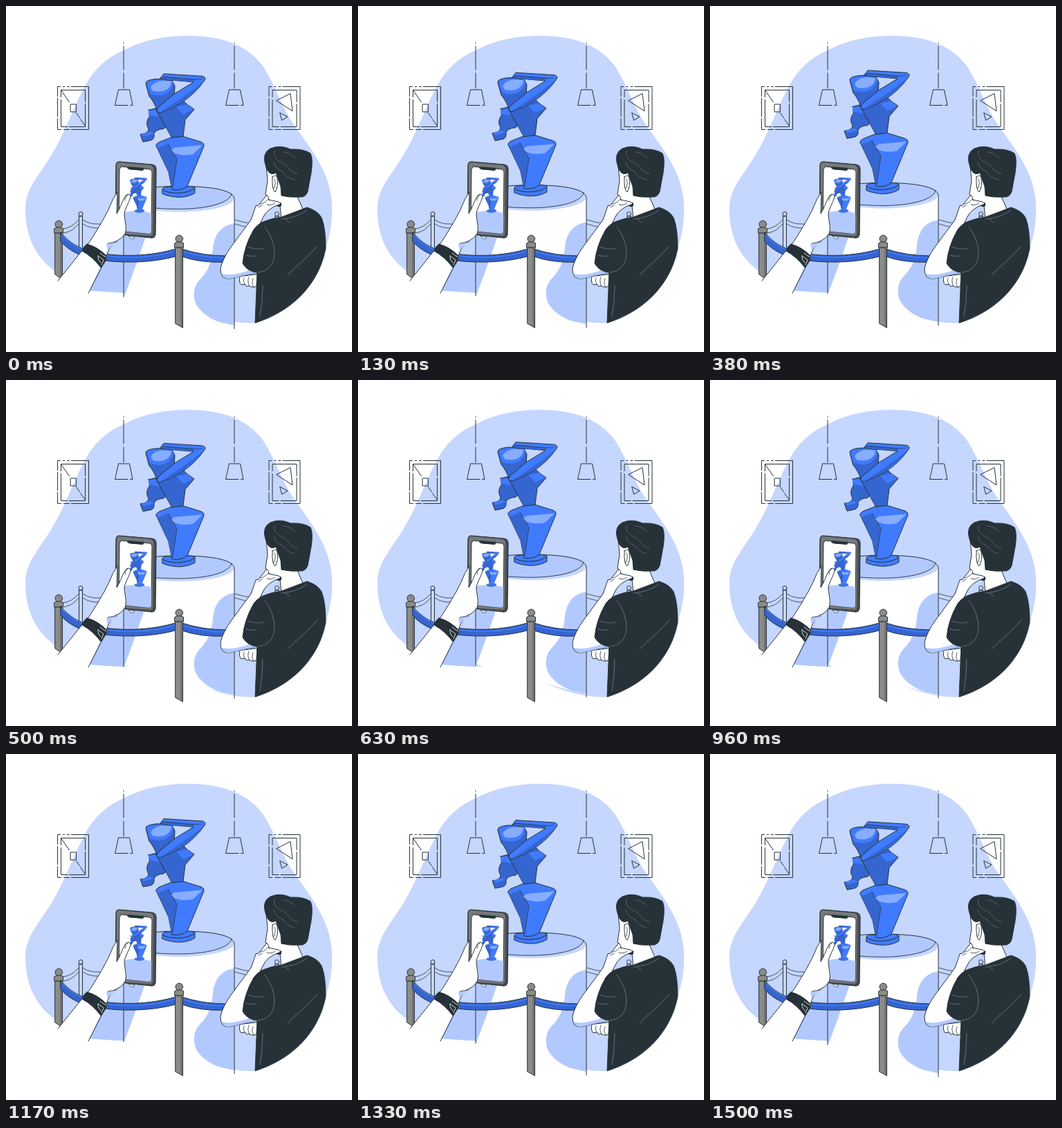
Recreate the animation shown at these times as an HTML page with a canvas. Size 500 px wide and 500 px high, loop 1.54 s.

```html
<!DOCTYPE html>
<html lang="en">
<head>
<meta charset="utf-8">
<title>Museum visit</title>
<style>
  html, body { margin: 0; width: 100%; height: 100%; overflow: hidden; background: #fff; }
  canvas { display: block; width: 500px; height: 500px; }
</style>
</head>
<body>
<canvas id="stage" width="500" height="500"></canvas>
<script>
const ctx = document.getElementById('stage').getContext('2d');
const LOOP = 1540, RISE = 10;
const INK = '#263238', PALE = '#c5d6ff', SHADE = '#b2c9ff', BLUE = '#407bff',
      DEEP = '#3565cf', GLOSS = '#87adff', GREY = '#8b8b8b', WHITE = '#fff';
const cache = new Map();

function path(d) {
  if (!cache.has(d)) cache.set(d, new Path2D(d));
  return cache.get(d);
}

function fill(d, color) {
  ctx.fillStyle = color;
  ctx.fill(path(d));
}

function line(d, width = 1, color = INK) {
  ctx.strokeStyle = color;
  ctx.lineWidth = width;
  ctx.stroke(path(d));
}

function shape(d, color, width = 1) {
  fill(d, color);
  line(d, width);
}

function ball(x, y, r, color) {
  ctx.beginPath();
  ctx.arc(x, y, r, 0, Math.PI * 2);
  ctx.fillStyle = color;
  ctx.fill();
  ctx.strokeStyle = INK;
  ctx.lineWidth = 1;
  ctx.stroke();
}

function shifted(x, y, draw, scale = 1) {
  ctx.save();
  ctx.translate(x, y);
  ctx.scale(scale, scale);
  draw();
  ctx.restore();
}

function blob() {
  fill(`M262 43C313 43 350 57 372 88C390 116 398 146 417 173C443 209 470 244 471 288
    C472 318 467 334 461 353C453 386 428 436 360 458
    C327 460 296 448 265 437C235 425 202 414 165 414Q140 413 118 411
    C88 398 61 379 48 361C33 341 28 316 28 293C28 262 50 243 67 213
    C86 182 98 143 119 107C136 82 152 72 172 63C199 49 229 43 262 43Z`, PALE);
  fill('M144 366Q157 370 170 371V414.5L118 411Z', SHADE);
}

function lamp(x) {
  line(`M${x} 53V54M${x} 58V92M${x} 97V119M${x - 7} 121H${x + 8.5}L${x + 13} 143.5H${x + 9.5}
    M${x + 6} 143.5H${x - 12.5}L${x - 7.5} 121`);
}

function pictureFrame() {
  line(`M0 14V0H4M8 0H10M14 0H17M20 0H45V62H20M17 62H9M5 62H0V46M0 43V17
    M5 15V5H40V22M40 25V58H17M14 58H5V19`);
}

function pictures() {
  shifted(74.5, 116.5, () => {
    pictureFrame();
    line('M19 25.5H27V36.5H19ZM5 5L17 22.5M27 38L32 45M33 47L40 57');
  });
  shifted(380, 116.5, () => {
    pictureFrame();
    line('M11 20L31 10L34 35ZM16 38L27 43.5L19 48.5Z');
  });
}

function backRopes() {
  for (const x of [108, 391.5]) {
    line(`M${x - 2.5} 304V360M${x + 2.5} 304V360M${x - 3} 304H${x + 3}`);
    ball(x, 300.5, 3, PALE);
  }
  line(`M82 322Q95 321 105 309M83 328Q95 327 105 315
    M111 309Q122 318 148 314M111 315Q124 324 145 320
    M331 309Q360 320 389 307M331 315Q360 326 389 313`, 0.8);
}

function sculpture(width) {
  const part = (d, color) => shape(d, color, width);

  part('M226 264Q226 261 236 261L267 260L273 262V270Q263 276 249 276Q234 275 226 271Z', BLUE);
  line('M226 265Q232 270 249 270Q266 269 273 263', width);

  part('M218 204Q214 200 222 196L240 189L256 188L282 196Q287 198 286 202L262 260Q253 267 240 265L235 240Z', BLUE);
  fill('M219 205L234 199L247 221L240 264L235 240Z', DEEP);
  fill('M238 208L244 204L284 200.5L270 214Q254 217 243 212Z', GLOSS);
  line('M234 199L247 221L241 262', width * .7);

  part(`M206 150L222 146L237 154L234 171L228 177Q216 178 214 184
    Q215 193 208 194L198 196L194 185Q206 184 206 177C203 172 203 168 205 163Q210 157 206 150Z`, DEEP);
  fill('M206 151L219 149L223 160L206 157ZM195 185L207 181L214 184L199 188Z', BLUE);

  part('M217 149L238 126L253 133L262 142L272 149L259 164L256 188L240 190Z', DEEP);
  fill('M246 145L262 142L271 149L256 156Z', BLUE);

  part('M202 112Q200 107 216 105L239 105L244 115L243 132L219 152Q214 138 207 130Z', DEEP);
  fill('M203 111Q203 107 217 106L239 106Q246 112 234 125Q222 132 208 126Z', BLUE);
  fill('M209 117Q213 109 225 107.5L239 108Q239 116 231 121Q222 125 212 122Z', GLOSS);

  part(`M223 104L228 97.5L284 101Q290 103 287 107Q274 126 254 139Q239 149 222 154
    Q214 152 221 145L244 126L271 109.5L242 107Q234 108 223 104Z`, BLUE);
  fill('M223 104L228 101L273 105L270 109L242 107Z', DEEP);
  fill('M286 108Q271 126 252 139Q239 148 222 153.5Q238 143 250 135Q268 123 286 108Z', DEEP);
  line('M226 102L271 106L283 105', width * .6);
}

function exhibit() {
  const body = `M170 277L330 277V461Q296 454 265 445Q252 452 245 445
    Q210 434 182 423L170 418Z`;
  fill(body, WHITE);
  ctx.save();
  ctx.clip(path(body));
  fill('M170 277H222C205 322 189 374 171 419H170Z', SHADE);
  fill(`M330 314C311 316 301 330 299 350C297 373 290 385 280 395C270 405 270 421 275 431
    C285 448 305 457 330 463Z`, SHADE);
  ctx.restore();
  fill('M170 277C172 265 208 260 250 260C295 260 330 267 330 277C330 288 294 297 250 297C206 297 170 288 170 277Z', PALE);
  fill('M170 276C172 265 208 260 250 260C295 260 329 267 326 272C322 286 294 293 250 293C206 293 170 287 170 276Z', SHADE);
  line('M170 420V277C170 266 208 260 250 260C303 260 330 267 330 279V466');
  line('M171 278C178 289 214 293 250 293C288 293 324 285 326 271', 0.9);
  sculpture(1);
}

function post(x, y, bottom, slope) {
  const left = x - 5, right = x + 5.5;
  shape(`M${left} ${y + 13}H${right}V${bottom + slope}L${left} ${bottom}Z`, GREY);
  fill(`M${x + 2} ${y + 13}H${right - .5}V${bottom + slope - 1}L${x + 2} ${bottom + slope / 2}Z`, '#737373');
  ball(x + .3, y + .5, 5.3, GREY);
  shape(`M${x - 6} ${y + 6.5}Q${x} ${y + 3} ${x + 6.5} ${y + 6.5}V${y + 13}H${x - 6}Z`, GREY);
}

function ropes() {
  post(76, 315, 388, 7);
  shape(`M79 327C92 343 105 349 120 354C160 364 211 362 248 350V361
    C211 372 161 373 118 364C101 358 88 351 79 340Z`, DEEP);
  line('M82 332C95 346 107 351 122 356C162 367 211 365 245 354', 1.5, BLUE);
  shape('M254 351Q284 361 319 361V370Q282 372 254 362Z', DEEP);
  line('M256 355Q286 364 317 364', 1.5, BLUE);
  post(250, 336, 459, 6);
}

function phone() {
  shape(`M164 225L211 229Q217 230 217 236L216 330Q215 336 209 335L164 330
    Q158 329 158 323L159 230Q159 225 164 225Z`, '#4b4d4f', 1.2);
  fill('M164 226L208 230Q213 231 213 236L212 328Q211 333 207 332L164 329Q159 328 159 323L160 230Q160 226 164 226Z', '#777a7c');
  const screen = `M167 232L175 233Q176 236 180 236L195 237Q198 237 199 235L207 236Q211 236 211 240
    L210 325Q210 329 206 329L167 325Q163 324 163 320L164 236Z`;
  shape(screen, WHITE, 1);
  fill('M175 232L200 234L198 238L178 236Z', INK);
  ctx.save();
  ctx.clip(path(screen));
  fill('M163 300Q190 292 211 300V330H163Z', SHADE);
  shifted(121.8, 220, () => sculpture(.8), .285);
  ctx.restore();
}

function viewer() {
  fill('M75 397L116 346L144 360L119 415Z', WHITE);
  line('M75 397L116 346M119 415L140 374');
  shape('M177 332L186 334Q185 338 181 336Z', WHITE, .8);
  shape(`M118 345C130 327 142 307 149 292Q154 278 161 269L160 300
    C166 291 168 280 174 273Q180 270 180 276C178 284 171 294 171 301
    C172 313 175 321 172 329Q166 338 156 341Q149 349 145 361Z`, WHITE);
  fill('M145 344Q153 341 160 340Q152 346 147 354Z', SHADE);
  line('M172 281Q172 275 176 273M147 343Q153 342 160 341', .8);
  shape('M117 344Q133 348 146 362Q143 372 137 378Q126 363 110 354Q112 347 117 344Z', INK);
  line('M136 357Q140 361 145 363M133 361L141 367L138 374M133 361Q132 366 137 371', .9, '#e9eef0');
}

function man() {
  shape('M338 391Q336 399 340 403L345 402Q348 407 351 404Q356 408 362 405L363 388Z', WHITE);
  line('M344 393Q342 399 346 403M351 392Q348 399 352 405M357 394Q354 401 358 406', .8);

  shape(`M376 231L378 252L375 272L378 278Q386 286 396 288L398 309L430 296
    L410 250L390 228Z`, WHITE);
  fill('M388 287L398 284L398 289Q393 292 388 287Z', INK);
  shape(`M365 288L377 273Q381 277 379 280L389 282Q395 282 397 286L387 290Q378 295 374 301
    Q369 310 365 319L347 352L343 373L364 385Q343 389 324 394Q309 396 310 379
    Q313 365 326 347L354 309Q358 298 361 289Z`, WHITE);
  fill('M312 387Q328 391 354 381L364 385Q344 389 324 394Q314 395 312 387Z', SHADE);
  line('M377 287Q384 289 389 285M367 286Q373 286 378 280M365 291L370 288', .8);

  shape(`M398 305L435 291Q451 296 456 306Q462 321 462 350
    C455 388 428 436 360 458L363 385Q349 384 342 372Q344 347 358 323Q367 309 398 305Z`, INK);
  const fold = '#768087';
  line('M374 319Q388 337 388 358Q387 373 379 379Q374 384 364 385', .8, fold);
  line('M450 347Q434 365 416 380L407 389M371 404Q371 427 367 449', .8, fold);
  line('M398 308Q421 306 435 295M404 308L410 313', .8, fold);
  line('M349 348Q360 353 373 350M346 360Q355 363 362 361', .7, fold);

  shape(`M374 226Q371 212 382 206Q396 200 411 207Q430 206 440 213Q444 221 441 241
    L436 268Q433 277 424 276Q410 277 398 274L397 261L390 241Q382 246 377 236Z`, INK);
  shape('M385 247Q391 242 392 249Q394 260 389 269Q384 266 385 247Z', WHITE);
  line('M388 250Q391 255 387 264', .8);
  line('M389 209Q384 217 394 224Q405 229 409 235Q414 242 421 242M387 225Q389 236 400 239Q404 248 417 251M401 211Q412 212 417 219', .7, '#69747a');
}

function draw(time) {
  const phase = (time + 15) % LOOP / LOOP;
  const lift = RISE * (1 - Math.abs(1 - 2 * phase));
  ctx.fillStyle = WHITE;
  ctx.fillRect(0, 0, 500, 500);
  ctx.lineJoin = ctx.lineCap = 'round';
  blob();
  lamp(170);
  lamp(330);
  pictures();
  backRopes();
  shifted(0, 0.6 - lift, exhibit);
  ropes();
  phone();
  viewer();
  man();
}

const start = performance.now();
function tick() {
  draw(performance.now() - start);
  requestAnimationFrame(tick);
}
tick();
</script>
</body>
</html>
```
